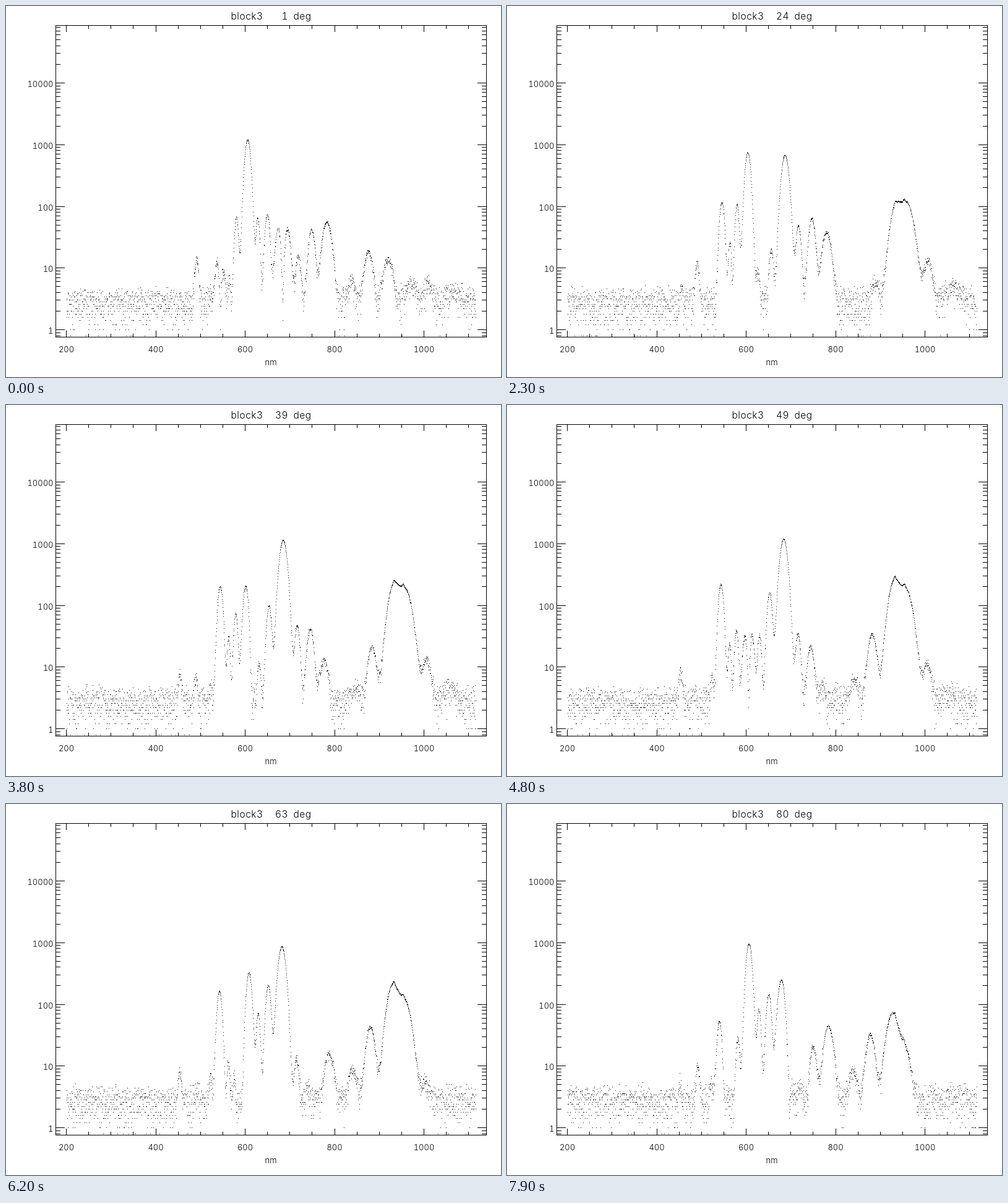
Animation, 800 px wide and 600 px high, one loop 8 s. Source, as an HTML page with a canvas:

```html
<!DOCTYPE html>
<html lang="en">
<head>
<meta charset="utf-8">
<title>Spectrum by angle</title>
<style>
  html, body { margin: 0; width: 100%; height: 100%; overflow: hidden; background: #fff; }
  canvas, svg { position: absolute; left: 0; top: 0; width: 800px; height: 600px; }
  text {
    font: 300 13px Inter, "DejaVu Sans", sans-serif;
    font-variant-numeric: tabular-nums;
    fill: #000;
  }
  .title { font-size: 15.5px; letter-spacing: 0.5px; }
</style>
</head>
<body>
<canvas id="plot" width="800" height="600"></canvas>
<svg id="labels" viewBox="0 0 800 600"></svg>
<script>
const ctx = document.getElementById('plot').getContext('2d');
const labels = document.getElementById('labels');

const LEFT = 80, RIGHT = 776, TOP = 31, BOTTOM = 535;
const STEP_MS = 100, STEPS = 80;
const SAMPLES = 2048;
const BASELINE = 2.55;

// Lobes: centre px, sigma px, height, extinction angle, degrees per px
const LOBES = [
  [281, 2.2, 6, 8, 1.5],
  [308, 2.7, 12, 55, 1.5],
  [331, 2, 4.5, 15, 1.5],
  [346, 3.6, 215, 2, 1.8],
  [360, 1.9, 27, 80, 1.6],
  [372, 2.7, 105, 66, 1.5],
  [390.5, 4.1, 1200, 49, 1.3],
  [407.5, 2.5, 82, 31, 1.4],
  [424, 3.5, 200, 18, 1.4],
  [447.5, 5.4, 1200, 1, 1.15],
  [471, 3.4, 48, 76, 1.1],
  [493, 4.5, 61, 65, 1],
  [518.5, 6.5, 54, 50, 0.8],
  [560, 6, 6, 24, 0.7],
  [589, 6.1, 40, 19, 1],
  [626, 8, 240, 5, 0.5],
  [627, 1.4, 28, 5, 0.5],
  [642, 1.4, 22, -1, 0.3],
  [645, 9, 180, -1, 0.3],
  [680, 6, 11.5, 77, 0.7],
  [720, 12, 2.5, 66, 0.5]
];

const yOf = v => 523.5 - 99.75 * Math.log10(v);
const dot = (x, y, w = 1, h = 1) => ctx.fillRect(Math.floor(x), Math.floor(y), w, h);

function addText(str, x, y, anchor, cls) {
  const el = document.createElementNS('http://www.w3.org/2000/svg', 'text');
  el.setAttribute('x', x);
  el.setAttribute('y', y);
  el.setAttribute('text-anchor', anchor);
  if (cls) el.setAttribute('class', cls);
  el.textContent = str;
  labels.appendChild(el);
  return el;
}

function random(seed) {
  let s = seed | 0;
  return () => {
    s = (s + 0x6D2B79F5) | 0;
    let r = Math.imul(s ^ (s >>> 15), 1 | s);
    r = (r + Math.imul(r ^ (r >>> 7), 61 | r)) ^ r;
    return ((r ^ (r >>> 14)) >>> 0) / 4294967296;
  };
}

function signal(x, angle) {
  let sum = BASELINE;
  for (const [centre, sigma, height, dark, slope] of LOBES) {
    const dx = x - centre;
    if (Math.abs(dx) > 5 * sigma) continue;
    const turn = Math.sin((angle - dark + slope * dx) * Math.PI / 90);
    sum += height * Math.exp(-dx * dx / (2 * sigma * sigma)) * turn * turn;
  }
  return sum;
}

function drawAxes() {
  dot(LEFT, TOP, RIGHT - LEFT + 1, 1);
  dot(LEFT, BOTTOM, RIGHT - LEFT + 1, 1);
  dot(LEFT, TOP, 1, BOTTOM - TOP + 1);
  dot(RIGHT, TOP, 1, BOTTOM - TOP + 1);

  for (let k = 0; k <= 18; k++) {
    const x = 97.5 + 36.125 * k;
    const len = k % 4 ? 5 : 10;
    dot(x, TOP, 1, len + 1);
    dot(x, BOTTOM - len, 1, len + 1);
  }
  for (let decade = -1; decade <= 4; decade++) {
    for (let m = 1; m <= 9; m++) {
      const y = yOf(m * 10 ** decade);
      if (y < TOP || y > BOTTOM) continue;
      const len = m === 1 ? 14 : 7;
      dot(LEFT, y, len + 1, 1);
      dot(RIGHT - len, y, len + 1, 1);
    }
  }
}

function drawSamples(angle) {
  const rnd = random(angle * 7919);
  for (let i = 0; i < SAMPLES; i++) {
    const x = 98 + i * 661.5 / (SAMPLES - 1);
    const level = signal(x, angle);
    const spread = Math.sqrt(1 + 0.02 * (level - BASELINE));
    const noise = (rnd() + rnd() + rnd() - 1.5) * 2 * spread;
    const value = Math.round((level + noise) * 5) / 5;
    if (value < 0.77) continue;
    dot(x, yOf(value));
  }
}

for (let k = 0; k < 5; k++) {
  addText(String(200 + 200 * k), 97.5 + 144.5 * k, 559.5, 'middle');
  addText(String(10 ** k), 76.5, Math.round(yOf(10 ** k) + 6.5), 'end');
}
addText('nm', 428, 580.5, 'middle');
addText('block3', 363.5, 22, 'start', 'title');
const angleText = addText('1', 456, 22, 'end', 'title');
addText('deg', 464.5, 22, 'start', 'title');

let shown = 0;
function render(now) {
  const angle = 1 + Math.floor(now / STEP_MS) % STEPS;
  if (angle !== shown) {
    shown = angle;
    ctx.fillStyle = '#fff';
    ctx.fillRect(0, 0, 800, 600);
    ctx.fillStyle = '#000';
    drawAxes();
    drawSamples(angle);
    angleText.textContent = angle;
  }
}

const start = performance.now();
function tick() {
  render(performance.now() - start);
  requestAnimationFrame(tick);
}
tick();
</script>
</body>
</html>
```
